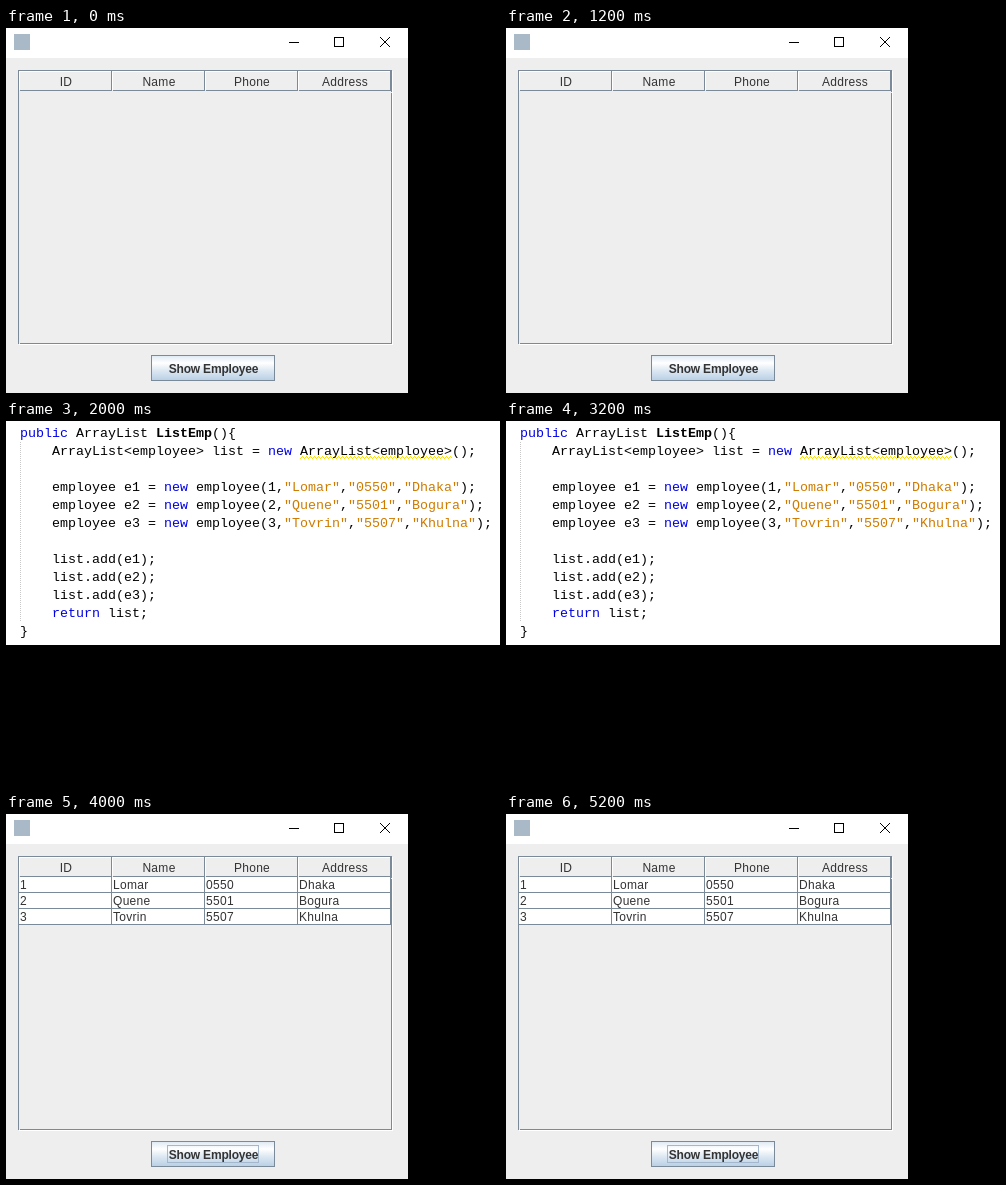
Recreate the animation shown at these times as an HTML page. Size 494 by 365 pixels, loop 6000 ms.

```html
<!DOCTYPE html>
<html lang="en">
<head>
<meta charset="utf-8">
<title>Employee table</title>
<style>
  html, body { margin: 0; width: 100%; height: 100%; overflow: hidden; background: #000; }
  svg { display: block; }
  .shapes { shape-rendering: crispEdges; }
  .line { fill: none; stroke: #7a8a99; }
  .light { fill: none; stroke: #fff; }
  .ui { font: 12px "Liberation Sans", Arial, sans-serif; letter-spacing: .3px; fill: #333; }
  .head { text-anchor: middle; }
  .button { font-weight: bold; letter-spacing: -.2px; text-anchor: middle; }
  .code text { font: 13.333px "Liberation Mono", "Courier New", monospace; white-space: pre; fill: #000; }
  .code .k { fill: #0000e6; }
  .code .s { fill: #ce7b00; }
  .code .b { font-weight: bold; }

  .code, .filled { visibility: hidden; animation: 6s step-end infinite; }
  .code { animation-name: code; }
  .filled { animation-name: filled; }
  @keyframes code {
    0% { visibility: hidden; }
    33.3333% { visibility: visible; }
    66.6667%, 100% { visibility: hidden; }
  }
  @keyframes filled {
    0% { visibility: hidden; }
    66.6667%, 100% { visibility: visible; }
  }
</style>
</head>
<body>
<svg width="494" height="365" viewBox="0 0 494 365">
  <defs>
    <linearGradient id="steel" x2="0" y2="1">
      <stop offset="0" stop-color="#dde8f3"/>
      <stop offset=".3" stop-color="#fff"/>
      <stop offset=".6" stop-color="#dde8f3"/>
      <stop offset="1" stop-color="#b8cfe5"/>
    </linearGradient>
    <pattern id="wave" x="294" y="35" width="4" height="3" patternUnits="userSpaceOnUse">
      <path class="shapes" fill="#ffe000" d="M0 2h1v1h-1zM1 1h1v1h-1zM2 0h1v1h-1zM3 1h1v1h-1z"/>
    </pattern>
    <g id="cell">
      <path class="line" d="M92.5 0V20M1 19.5H93"/>
      <path class="light" d="M0 .5H92M.5 0V19"/>
    </g>
  </defs>

  <!-- window -->
  <g class="shapes">
    <path fill="#eee" d="M0 0H402V365H0z"/>
    <path fill="#fff" d="M0 0H402V30H0z"/>
    <rect x="8" y="6" width="16" height="16" fill="#a9b9c8"/>
    <path fill="none" stroke="#000" d="M283 14.5H293M328.5 9.5H337.5V18.5H328.5z"/>
    <path class="line" d="M12.5 42.5H385.5V315.5H12.5z"/>
    <path class="light" d="M386.5 43V317M13 316.5H387"/>
    <path fill="#eee" d="M385 64h1v1h-1zM13 315h1v1h-1z"/>
    <use href="#cell" x="13" y="43"/>
    <use href="#cell" x="106" y="43"/>
    <use href="#cell" x="199" y="43"/>
    <use href="#cell" x="292" y="43"/>
    <rect class="line" x="145.5" y="327.5" width="123" height="25" style="fill:url(#steel)"/>
  </g>
  <path fill="none" stroke="#000" d="M374 9L384 19M384 9L374 19"/>
  <g class="ui head">
    <text x="60" y="58">ID</text>
    <text x="153" y="58">Name</text>
    <text x="246" y="58">Phone</text>
    <text x="339" y="58">Address</text>
  </g>
  <text class="ui button" x="207.5" y="345">Show Employee</text>

  <!-- table rows and button focus -->
  <g class="filled">
    <g class="shapes">
      <path fill="#fff" d="M13 63H385V111H13z"/>
      <path class="line" d="M13 78.5H385M13 94.5H385M13 110.5H385M105.5 63V111M198.5 63V111M291.5 63V111M384.5 63V111"/>
      <path fill="none" stroke="#a3b8cc" d="M161.5 331.5H252.5V348.5H161.5z"/>
    </g>
    <g class="ui">
      <text y="75"><tspan x="14">1</tspan><tspan x="107">Lomar</tspan><tspan x="200">0550</tspan><tspan x="293">Dhaka</tspan></text>
      <text y="91"><tspan x="14">2</tspan><tspan x="107">Quene</tspan><tspan x="200">5501</tspan><tspan x="293">Bogura</tspan></text>
      <text y="107"><tspan x="14">3</tspan><tspan x="107">Tovrin</tspan><tspan x="200">5507</tspan><tspan x="293">Khulna</tspan></text>
    </g>
  </g>

  <!-- code editor -->
  <g class="code">
    <path d="M0 0H494V365H0z"/>
    <path fill="#fff" d="M0 0H494V224H0z"/>
    <path class="shapes" fill="none" stroke="#c8c8c8" stroke-dasharray="1 1" d="M14.5 21V200"/>
    <rect x="294" y="35" width="152" height="3" fill="url(#wave)"/>
    <text x="14" y="16"><tspan class="k">public</tspan> ArrayList <tspan class="b">ListEmp</tspan>(){</text>
    <text x="46" y="34">ArrayList&lt;employee&gt; list = <tspan class="k">new</tspan> ArrayList&lt;employee&gt;();</text>
    <text x="46" y="70">employee e1 = <tspan class="k">new</tspan> employee(1,<tspan class="s">"Lomar"</tspan>,<tspan class="s">"0550"</tspan>,<tspan class="s">"Dhaka"</tspan>);</text>
    <text x="46" y="88">employee e2 = <tspan class="k">new</tspan> employee(2,<tspan class="s">"Quene"</tspan>,<tspan class="s">"5501"</tspan>,<tspan class="s">"Bogura"</tspan>);</text>
    <text x="46" y="106">employee e3 = <tspan class="k">new</tspan> employee(3,<tspan class="s">"Tovrin"</tspan>,<tspan class="s">"5507"</tspan>,<tspan class="s">"Khulna"</tspan>);</text>
    <text x="46" y="142">list.add(e1);</text>
    <text x="46" y="160">list.add(e2);</text>
    <text x="46" y="178">list.add(e3);</text>
    <text x="46" y="196"><tspan class="k">return</tspan> list;</text>
    <text x="14" y="214">}</text>
  </g>
</svg>
</body>
</html>
```
